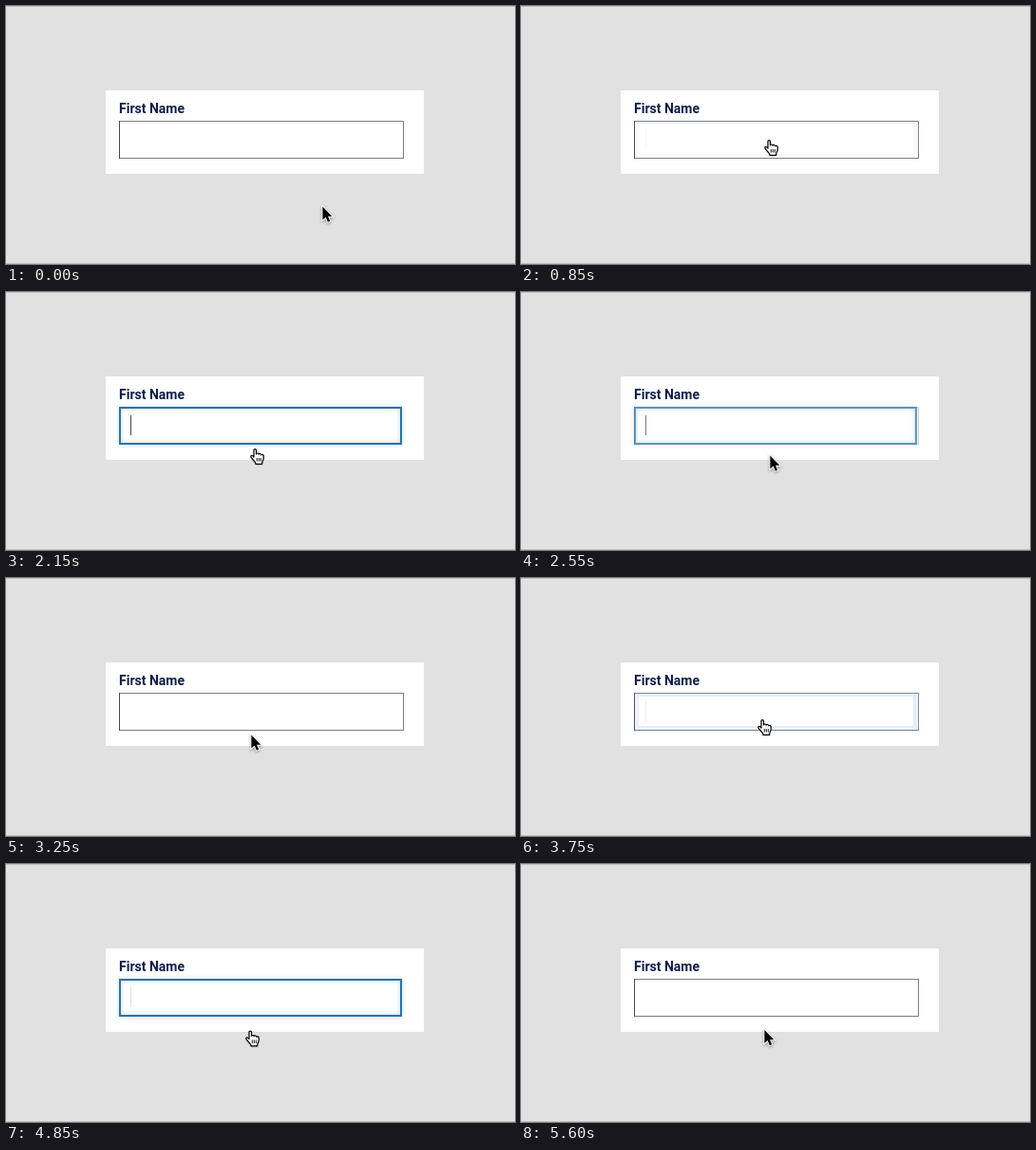
Animation of 536x272 px, one loop 5900 ms. Source, as an HTML page with a canvas:

```html
<!DOCTYPE html>
<html lang="en">
<head>
<meta charset="utf-8">
<title>Text field focus</title>
<style>
  html, body { margin: 0; width: 100%; height: 100%; overflow: hidden; background: #e1e1e1; }
  canvas { display: block; }
</style>
</head>
<body>
<canvas id="stage" width="536" height="272"></canvas>
<script>
const ctx = document.getElementById('stage').getContext('2d');
const LOOP = 5900;
const STEP = 50;

// Pointer hotspot: [time, x, y]
const route = [
  [150, 334, 212], [350, 296, 174], [550, 261, 141],
  [1990, 261, 141], [2150, 262, 165], [2300, 263, 173],
  [3200, 263, 173], [3250, 259, 166], [3450, 254, 149],
  [4580, 254, 149], [4840, 257, 175.5]
];
const handSpans = [[400, 2250], [3350, 4900]];
const clicks = [[700, 800], [2400, 2550], [3600, 3750], [5100, 5200]];

const handShape = new Path2D(
  'M4 9V1.8Q4 .6 5.2 .6Q6.5 .6 6.5 1.8V6Q6.7 4.9 8 5Q9 5.1 9.2 6.2' +
  'Q9.5 5.2 10.6 5.5Q11.6 5.8 11.7 6.8Q12.2 6 13.2 6.4Q14.2 6.8 14.2 8' +
  'V10.5Q14.2 12 13 13.5L12.6 16.4H6L5.6 14.6Q3 11.8 1 9.2Q.4 8 1.3 7.5Q2.3 7.1 4 9Z');
const knuckles = new Path2D('M7.3 10V13.5M9.3 10V13.5M11.3 10V13.5');
const arrowShape = new Path2D('M0 0V14.2L3.3 11.2L5.5 16.4L7.8 15.4L5.6 10.4H10Z');

const ramp = (t, start, length) => Math.min(1, Math.max(0, (t - start) / length));
const within = (t, spans) => spans.some(([a, b]) => t >= a && t < b);

function pointerAt(t) {
  const next = route.findIndex(p => p[0] > t);
  if (next === 0) return route[0].slice(1);
  if (next < 0) return route[route.length - 1].slice(1);
  const [t0, x0, y0] = route[next - 1];
  const [t1, x1, y1] = route[next];
  const k = (t - t0) / (t1 - t0);
  return [x0 + (x1 - x0) * k, y0 + (y1 - y0) * k];
}

function focusAt(t) {
  return t < 3000
    ? ramp(t, 842, 220) - ramp(t, 2510, 140)
    : ramp(t, 3728, 220) - ramp(t, 5190, 140);
}

function caretAt(t) {
  const blink = t < 3000
    ? 1 - ramp(t, 1410, 330) + ramp(t, 1975, 125)
    : 1 - ramp(t, 4260, 330) + ramp(t, 4830, 120);
  return blink * focusAt(t);
}

function rect(color, x, y, w, h) {
  ctx.fillStyle = color;
  ctx.fillRect(x, y, w, h);
}

function outline(color, width, x, y, w, h) {
  ctx.strokeStyle = color;
  ctx.lineWidth = width;
  ctx.strokeRect(x, y, w, h);
}

function withAlpha(alpha, draw) {
  if (alpha <= 0) return;
  ctx.save();
  ctx.globalAlpha = alpha;
  draw();
  ctx.restore();
}

function drawField(focus) {
  withAlpha(1 - focus, () => {
    outline('#7c7c7c', 1, 119.5, 121.5, 299, 39);
    rect('#484848', 119, 121, 1, 40);
  });
  withAlpha(Math.min(1, focus * 10) * (1 - focus), () =>
    outline('#e3edf8', 2, 123, 124, 291, 33));
  withAlpha(focus, () => {
    ctx.shadowColor = 'rgba(90, 160, 220, 0.55)';
    ctx.shadowBlur = 4;
    outline('#3072a6', 2, 120, 122, 296, 38);
  });
}

function drawClick(x, y) {
  ctx.beginPath();
  ctx.arc(x, y, 30, 0, Math.PI * 2);
  ctx.strokeStyle = 'rgba(60, 60, 60, 0.7)';
  ctx.lineWidth = 2;
  ctx.stroke();
}

function drawHand(x, y) {
  ctx.save();
  ctx.translate(x - 5, y);
  ctx.lineJoin = 'round';
  ctx.shadowColor = 'rgba(0, 0, 0, 0.25)';
  ctx.shadowBlur = 2;
  ctx.shadowOffsetY = 1;
  ctx.fillStyle = '#fff';
  ctx.fill(handShape);
  ctx.shadowColor = 'transparent';
  ctx.strokeStyle = '#000';
  ctx.lineWidth = 1.2;
  ctx.stroke(handShape);
  ctx.lineWidth = 0.9;
  ctx.stroke(knuckles);
  ctx.restore();
}

function drawArrow(x, y) {
  ctx.save();
  ctx.translate(x - 0.6, y - 0.6);
  ctx.shadowColor = 'rgba(0, 0, 0, 0.4)';
  ctx.shadowBlur = 3;
  ctx.shadowOffsetY = 1;
  ctx.strokeStyle = '#fff';
  ctx.lineWidth = 2;
  ctx.stroke(arrowShape);
  ctx.shadowColor = 'transparent';
  ctx.fillStyle = '#000';
  ctx.fill(arrowShape);
  ctx.restore();
}

function draw(t) {
  rect('#e1e1e1', 0, 0, 536, 272);
  rect('#c2c2c2', 0, 0, 536, 1);
  rect('#c2c2c2', 0, 271, 536, 1);
  rect('#fff', 105, 89, 335, 88);

  ctx.font = 'bold 14px Roboto, sans-serif';
  ctx.fillStyle = '#101d4c';
  ctx.fillText('First Name', 119, 113);

  drawField(focusAt(t));
  withAlpha(caretAt(t), () => rect('#444', 131, 130, 1, 21));

  const [x, y] = pointerAt(t);
  if (within(t, clicks)) drawClick(x, y);
  (within(t, handSpans) ? drawHand : drawArrow)(x, y);
}

function tick() {
  const t = performance.now() % LOOP;
  draw(Math.floor(t / STEP) * STEP);
  requestAnimationFrame(tick);
}
tick();
</script>
</body>
</html>
```
